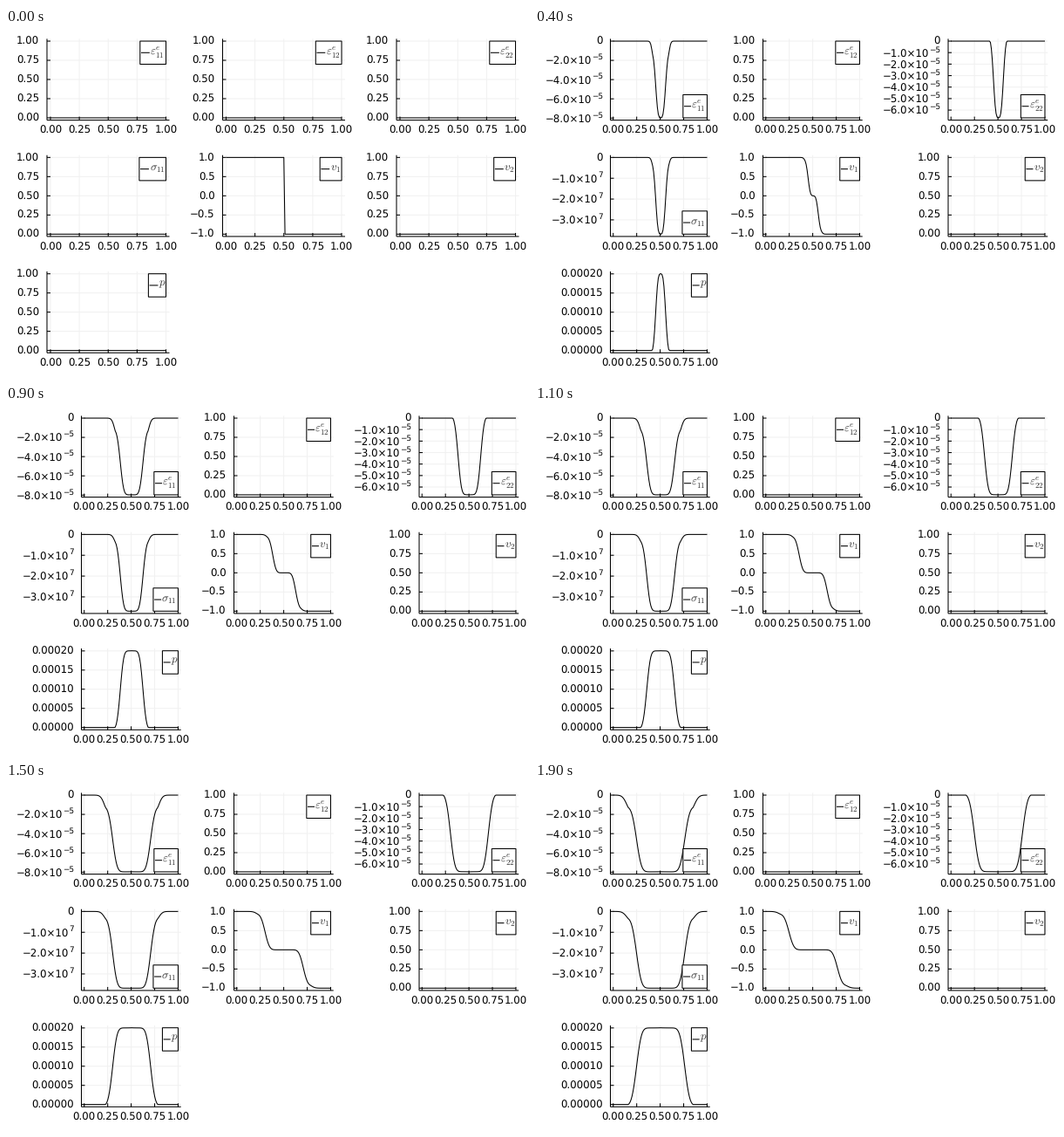
A matplotlib script that plays this animation: 600x400 px, repeating every 2000 ms.

```python
import numpy as np
import matplotlib.pyplot as plt
from matplotlib.animation import FuncAnimation
from matplotlib.patches import Rectangle

W, H, DPI = 600, 400, 100
FRAMES, INTERVAL = 20, 100
PX = 72 / DPI                      # points per pixel
FONT = 8.5                         # tick label size in points
EM = FONT / PX
MINUS = "\u2212"

plt.rcParams["font.family"] = "DejaVu Sans"
plt.rcParams["mathtext.fontset"] = "cm"
plt.rcParams["text.hinting"] = "none"

# Elastic, perfectly plastic bar: Young 200 GPa, Poisson 0.3
MU, LAM, RHO, YIELD = 2e11 / 2.6, 0.3 * 2e11 / (1.3 * 0.4), 7800.0, 2e6
C = np.sqrt((LAM + 2 * MU) / RHO)
X = np.linspace(0, 1, 101)
DX = X[1] - X[0]
SUBSTEPS = 4
DT = 2.95e-6 / SUBSTEPS


def stress(e11, e22):
    return LAM * (e11 + 2 * e22) + 2 * MU * e11


def simulate():
    """Two halves colliding at the middle; one snapshot per frame."""
    v = np.where(X <= 0.5 + 1e-9, 1.0, -1.0)
    e11, e22, p, zero = (np.zeros_like(X) for _ in range(4))
    limit = YIELD / (2 * MU)
    shots = []
    for _ in range(FRAMES):
        shots.append(dict(e11=e11, e12=zero, e22=e22, s11=stress(e11, e22),
                          v1=v, v2=zero, p=p))
        for _ in range(SUBSTEPS):
            s = np.pad(stress(e11, e22), 1, "edge")
            u = np.pad(v, 1, "edge")
            u_face = (u[1:] + u[:-1]) / 2 + np.diff(s) / (2 * RHO * C)
            s_face = (s[1:] + s[:-1]) / 2 + np.diff(u) * RHO * C / 2
            v = v + DT / DX / RHO * np.diff(s_face)
            e11 = e11 + DT / DX * np.diff(u_face)
            # radial return to the yield surface
            dev = e11 - e22
            excess = np.maximum(np.abs(dev) - limit, 0)
            e11 = e11 - 2 / 3 * excess * np.sign(dev)
            e22 = e22 + 1 / 3 * excess * np.sign(dev)
            p = p + excess
    return shots


SHOTS = simulate()

# key, column, row, legend label, label room, baseline drop, tick step, format
PANELS = [
    ("e11", 0, 0, r"$\varepsilon^e_{11}$", 18.5, 2.3, 2e-5, "sci"),
    ("e12", 1, 0, r"$\varepsilon^e_{12}$", 18.5, 2.3, 0.25, "%.2f"),
    ("e22", 2, 0, r"$\varepsilon^e_{22}$", 18.5, 2.3, 1e-5, "sci"),
    ("s11", 0, 1, r"$\sigma_{11}$", 19.4, 1.6, 1e7, "sci"),
    ("v1", 1, 1, r"$v_1$", 13.6, 1.6, 0.5, "%.1f"),
    ("v2", 2, 1, r"$v_2$", 13.6, 1.6, 0.25, "%.2f"),
    ("p", 0, 2, r"$p$", 8.9, 0.9, 5e-5, "%.5f"),
]
START = ((46.5, 248.0, 447.5), 140.5)   # column lefts, panel width
LATER = ((86.0, 261.0, 473.5), 114.2)
TOP, HEIGHT, PITCH = 11.9, 93.2, 133.33
PAD = 0.03
TICK = 4
GRID = "#f1f1f1"

fig = plt.figure(figsize=(W / DPI, H / DPI), dpi=DPI, facecolor="white")
ax = fig.add_axes([0, 0, 1, 1])


def line(xs, ys, color="black", width=1.05, z=2):
    ax.plot(xs, ys, color=color, lw=width * PX, zorder=z, snap=False,
            solid_capstyle="butt", solid_joinstyle="round")


def text(x, y, s, ha="right", size=FONT, z=4, color="black"):
    ax.text(x, y, s, ha=ha, va="baseline", fontsize=size, color=color,
            zorder=z)


def sci_label(x, y, value):
    """Right-aligned mantissa x 10 with a raised exponent."""
    mantissa, power = f"{value:.1e}".split("e")
    power = str(int(power)).replace("-", MINUS)
    scale = 0.75
    room = sum(0.838 if c == MINUS else 0.636 for c in power) * EM * scale
    text(x, y - 0.8, power, size=FONT * scale)
    text(x - room, y + 5.2, mantissa.replace("-", MINUS) + "\u00d710")


def tick_label(x, y, value, fmt):
    if fmt != "sci":
        text(x, y + 4, (fmt % value).replace("-", MINUS))
    elif value == 0:
        text(x, y + 4, "0")
    else:
        sci_label(x, y, value)


def legend(right, edge, below, width, label, room, drop):
    box_w, box_h = 0.08 * width + room, 26.5
    left = right - box_w
    top = edge - box_h if below else edge
    mid = top + box_h / 2
    ax.add_patch(Rectangle((left, top), box_w, box_h, fc="white", ec="black",
                           lw=1.05 * PX, zorder=5, snap=False))
    line([left + 1.2, left + 1.2 + 0.07 * width], [mid, mid], z=6)
    text(left + 0.08 * width + 0.4, mid + drop, label, "left", 9.3, 6, "#333")


def panel(data, left, width, top, label, room, drop, step, fmt):
    low, high = data.min(), data.max()
    if low == high:
        low, high, step, fmt = 0.0, 1.0, 0.25, "%.2f"
    bottom, right = top + HEIGHT, left + width
    span = high - low

    def px(x):
        return left + width * (x + PAD) / (1 + 2 * PAD)

    def py(y):
        return bottom - HEIGHT * ((y - low) / span + PAD) / (1 + 2 * PAD)

    first = int(np.ceil((low - PAD * span) / step - 1e-6))
    last = int(np.floor((high + PAD * span) / step + 1e-6))

    for x in np.arange(5) / 4:
        line([px(x)] * 2, [top, bottom], GRID, z=1)
        line([px(x)] * 2, [bottom, bottom - TICK])
        text(px(x), bottom + 15.4, f"{x:.2f}", "center")
    for k in range(first, last + 1):
        y = py(k * step)
        line([left, right], [y, y], GRID, z=1)
        line([left, left + TICK], [y, y])
        tick_label(left - 8.8, y, k * step, fmt)

    line([left, right], [bottom, bottom])
    line([left, left], [top, bottom])
    line(px(X), py(data), z=3)
    below = high <= 0
    legend(px(1), py(low if below else high), below, width, label, room, drop)


def draw(i):
    ax.clear()
    # whole numbers fall on pixel centres
    ax.set_xlim(-0.5, W - 0.5)
    ax.set_ylim(H - 0.5, -0.5)
    ax.axis("off")
    lefts, width = START if i == 0 else LATER
    for key, col, row, *style in PANELS:
        panel(SHOTS[i][key], lefts[col], width, TOP + PITCH * row, *style)
    return []


anim = FuncAnimation(fig, draw, frames=FRAMES, interval=INTERVAL,
                     repeat=True, repeat_delay=0)
plt.show()
```
